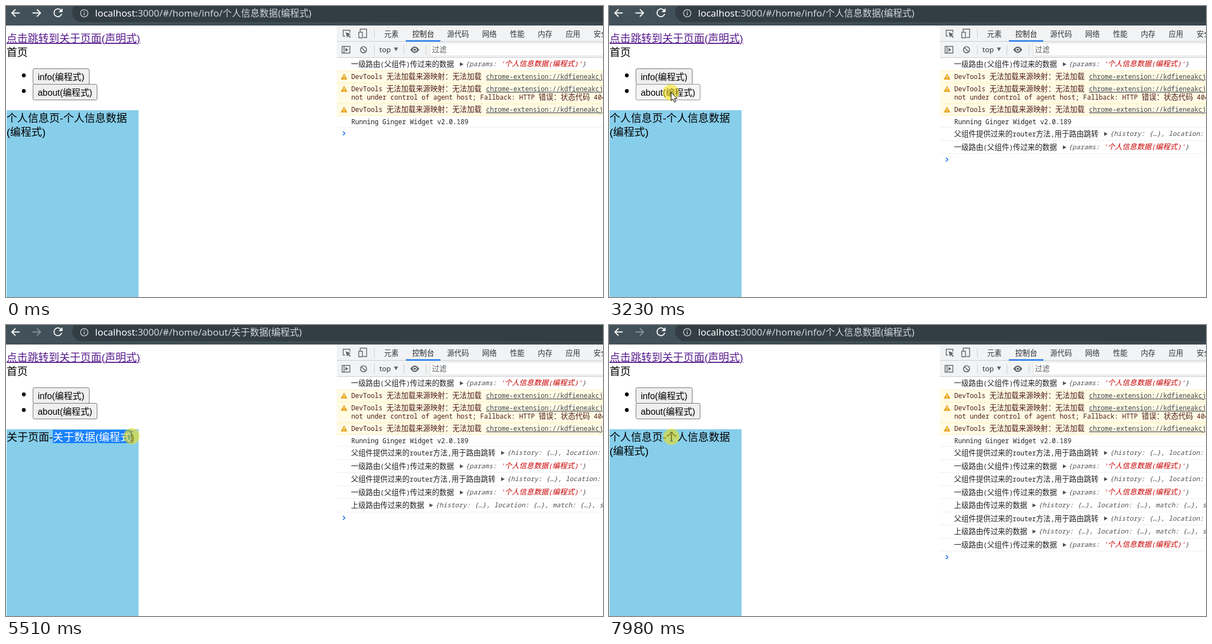
An HTML page for the animation above (8 s loop, 1072 by 522 pixels).

```html
<!DOCTYPE html>
<html lang="zh">
<head>
<meta charset="utf-8">
<style>
  html, body { margin: 0; width: 100%; height: 100%; overflow: hidden; background: #fff; }
  svg { display: block; }
  text { white-space: pre; }
</style>
</head>
<body>
<svg id="stage" width="1072" height="522" viewBox="0 0 1072 522">
  <defs>
    <linearGradient id="bar">
      <stop offset="0" stop-color="#43525a"/>
      <stop offset="1" stop-color="#39464e"/>
    </linearGradient>
    <clipPath id="selClip"><rect id="selClipBox" y="188" height="24"/></clipPath>
  </defs>
</svg>
<script>
const stage = document.getElementById('stage');
const SANS = "'Liberation Sans','Noto Sans CJK SC','Noto Sans CJK',sans-serif";
const UI = "'Noto Sans','Noto Sans CJK SC','Noto Sans CJK',sans-serif";
const MONO = "'Noto Sans Mono','Noto Sans CJK SC','Noto Sans CJK',monospace";

function el(tag, attrs, parent = stage) {
  const e = document.createElementNS('http://www.w3.org/2000/svg', tag);
  for (const k in attrs) e.setAttribute(k, attrs[k]);
  return parent.appendChild(e);
}
const group = (parent = stage) => el('g', {}, parent);
const rect = (x, y, width, height, fill, parent, more) =>
  el('rect', { x, y, width, height, fill, ...more }, parent);
const stroke = (d, color, width, parent) =>
  el('path', { d, fill: 'none', stroke: color, 'stroke-width': width }, parent);
const shape = (d, fill, parent) => el('path', { d, fill }, parent);
const show = (e, on) => { e.style.display = on ? '' : 'none'; };

// Adds text to a <text>, giving Chinese runs their own size.
function addRuns(node, str, cjkSize, attrs = {}) {
  for (const run of str.split(/([\u4e00-\u9fff\uff1a]+)/)) {
    if (!run) continue;
    const span = el('tspan', attrs, node);
    if (/[\u4e00-\u9fff]/.test(run)) span.setAttribute('font-size', cjkSize);
    span.textContent = run;
  }
}
function text(x, y, str, size, fill, parent, font = SANS, cjkSize = size, more = {}) {
  const node = el('text', { x, y, fill, 'font-size': size, 'font-family': font, ...more }, parent);
  addRuns(node, str, cjkSize);
  return node;
}
const mono = (x, y, str, fill, parent, more) =>
  text(x, y, str, 11.7, fill, parent, MONO, 13.15, more);

// Browser bar
rect(0, 0, 1072, 35, 'url(#bar)');
rect(119, -6, 1000, 35, '#323d44', stage, { rx: 17 });
stroke('M24.5 12.5H11M17 6l-6.5 6.5L17 19', '#fff', 1.8);
const forward = stroke('M47.5 12.5H61M55.5 6l6.5 6.5L55.5 19', '#fff', 1.8);
stroke('M99 8.2A7 7 0 1 0 100 14', '#fff', 1.8);
shape('M101.5 4v7h-7z', '#fff');
el('circle', { cx: 140.5, cy: 13, r: 6.6, fill: 'none', stroke: '#d3d8db', 'stroke-width': 1.3 });
stroke('M140.5 12v4.5M140.5 9v1.6', '#d3d8db', 1.5);
function address(path) {
  const node = text(160, 18.6, 'localhost', 17, '#fff', stage, UI, 16.6);
  addRuns(node, ':3000/#/home/' + path, 16.6, { fill: '#d2d7da' });
  return node;
}
const infoUrl = address('info/个人信息数据(编程式)');
const aboutUrl = address('about/关于数据(编程式)');

// Page
text(1, 65, '点击跳转到关于页面(声明式)', 18.95, '#551a8b', stage, SANS, 18.95,
  { 'text-decoration': 'underline' });
text(1, 89.5, '首页', 19.1, '#000');
function button(y, width, label) {
  el('circle', { cx: 32, cy: y + 12.5, r: 3.4 });
  const box = rect(48.5, y + .5, width, 28, '#efefef', stage, { rx: 2.5 });
  text(57, y + 20.5, label, 15.87, '#000');
  return (over, down) => {
    box.setAttribute('fill', over ? down ? '#f5f5f5' : '#e5e5e5' : '#efefef');
    box.setAttribute('stroke', over ? down ? '#8d8d8d' : '#4f4f4f' : '#767676');
  };
}
const infoButton = button(112, 101, 'info(编程式)');
const aboutButton = button(140, 115, 'about(编程式)');
rect(1, 187, 237, 335, '#87ceeb');

const infoPage = group(), aboutPage = group();
text(1, 207.5, '个人信息页-个人信息数据', 19.1, '#000', infoPage);
text(1, 232.5, '(编程式)', 19.1, '#000', infoPage);
const aboutText = '关于页面-关于数据(编程式)';
text(1.3, 207.5, aboutText, 19.1, '#000', aboutPage);
const selection = group(aboutPage);
const selBox = rect(0, 188, 0, 24, '#1a82fb', selection);
text(1.3, 207.5, aboutText, 19.1, '#fff', selection, SANS, 19.1, { 'clip-path': 'url(#selClip)' });
const selClipBox = document.getElementById('selClipBox');
const selStart = 1.3 + 19.1 * (4 + 1 / 3);
const edges = [selStart];
for (const c of '关于数据(编程式)') edges.push(edges.at(-1) + 19.1 * (/[()]/.test(c) ? 1 / 3 : 1));

// Developer panel
const GREY = '#5f6368';
rect(594, 35, 478, 57, '#f1f3f4');
rect(594, 63, 478, 1, '#cbcdd1');
rect(594, 92, 478, 1, '#cbcdd1');
stroke('M609 54h-3.5V43.5h12V48', GREY, 1.4);
shape('M610 47l9 3.5-3.6 1.5 3.5 3.5-1.5 1.5-3.5-3.5-1.5 3.6z', GREY);
stroke('M636 46v-4.5h11.5v15h-6M633.5 47h6.5v10h-6.5z', GREY, 1.4);
['元素', '控制台', '源代码', '网络', '性能', '内存', '应用', '安全'].forEach((tab, i) =>
  text([679, 729.5, 792, 855, 905, 955, 1005, 1055][i], 55, tab, 13.1, i == 1 ? '#202124' : '#333639', stage, UI));
rect(718, 61.5, 62, 2.5, '#1a73e8');
rect(661, 41, 1, 17, '#ccc');
for (const x of [661, 714, 754]) rect(x, 70, 1, 17, '#ccc');
stroke('M603.5 72.5h14v12h-14zM607 72.5v12', GREY, 1.4);
shape('M609.5 75l5 3.5-5 3.5z', GREY);
stroke('M636.5 78.5a5.5 5.5 0 1 0 11 0a5.5 5.5 0 1 0-11 0M638 74.5l8 8', GREY, 1.6);
text(670.5, 83, 'top', 13, '#333639', stage, UI);
shape('M696.5 74.5h7.5l-3.7 6.5z', GREY);
shape('M726 78.5q8-11.5 16 0q-8 11.5-16 0', GREY);
el('circle', { cx: 734, cy: 78.5, r: 3.6, fill: '#f1f3f4' });
el('circle', { cx: 734, cy: 78.5, r: 2.1, fill: GREY });
rect(761.5, 66.5, 320, 23, '#fff', stage, { stroke: '#dcdee0' });
text(765, 83, '过滤', 13.1, '#55595d', stage, UI);

// Console
const INK = '#202124', PREVIEW = '#4d5156', WARNING = '#4f1c14';
const rule = (y, parent, color = '#efefef') => rect(594, y, 478, 1, color, parent);
function expander(x, y, parent) {
  shape(`M${x} ${y - 3.5}l6.5 3.5-6.5 3.5z`, PREVIEW, parent);
}
function paramsRow(y, parent) {
  mono(619.5, y + 4, '一级路由(父组件)传过来的数据', INK, parent);
  expander(815, y, parent);
  const node = mono(825, y + 3.5, '', PREVIEW, parent, { 'font-style': 'italic' });
  addRuns(node, '{params: ', 13.15);
  addRuns(node, "'个人信息数据(编程式)'", 13.15, { fill: '#c80000' });
  addRuns(node, '}', 13.15);
}
function propsRow(y, label, x, parent) {
  mono(619.5, y + 4, label, INK, parent);
  expander(x, y - .5, parent);
  mono(x + 10.5, y + 3.2, '{history: {…}, location: {…}, match: {…}, staticContext: {…}}',
    PREVIEW, parent, { 'font-style': 'italic' });
}
const routerRow = (y, parent) => propsRow(y, '父组件提供过来的router方法,用于路由跳转', 889, parent);
const upperRow = (y, parent) => propsRow(y, '上级路由传过来的数据', 760.5, parent);

paramsRow(104.5);
for (const [top, height] of [[116, 22], [138, 37], [175, 21]]) {
  rect(594, top, 478, height, '#fffbe5');
  rule(top, stage, '#fff0b8');
  const y = top + 11;
  shape(`M607 ${y - 6}l6 11h-12z`, '#e8a317');
  stroke(`M607 ${y - 2.5}v4M607 ${y + 2.5}v1.5`, '#fff', 1.3);
  mono(620, y + 4, 'DevTools 无法加载来源映射：无法加载', WARNING);
  mono(862, y + 4, 'chrome-extension://kdfieneakcjfaiglcfcgkidlkmlijjnh', '#44474e', stage,
    { 'text-decoration': 'underline' });
}
mono(620, 168, 'not under control of agent host; Fallback: HTTP 错误：状态代码 404', WARNING);
rule(196, stage, '#fff0b8');
mono(620, 211.5, 'Running Ginger Widget v2.0.189', INK);
rule(217);

const ROW = 23.5;
const logged = [routerRow, paramsRow, routerRow, paramsRow, upperRow, routerRow, upperRow, paramsRow]
  .map((draw, i) => {
    const g = group();
    draw(230 + i * ROW, g);
    rule(Math.floor(217.5 + (i + 1) * ROW), g);
    return g;
  });
const prompt = stroke('M605 225l3.5 3.5-3.5 3.5', '#1a73e8', 1.6);

// Floating icon, click halo, pointer
const icon = el('circle', { cx: 263.5, cy: 164, fill: '#2a97b8' });
const pointer = group();
const halo = el('circle', { r: 14.5, fill: '#fce200', opacity: .52 }, pointer);
const arrow = el('path', {
  d: 'M.5 0v15l3.5-3.3 2.6 6 2.5-1.1-2.6-5.8h4.8z',
  fill: '#fff', stroke: '#000', 'stroke-linejoin': 'round'
}, pointer);
const beam = stroke('M-3-8h2.5l.5.5.5-.5h2.5M0-7.5v15M-3 8h2.5l.5-.5.5.5h2.5', '#555', .8, pointer);

const PATH = [ // ms, x, y
  [120, 769, 428], [500, 330, 225], [880, 120, 104], [1250, 105, 68], [1720, 89, 115],
  [1790, 88, 116], [1930, 84, 121], [2600, 84, 121], [3100, 111, 155], [3370, 111, 155],
  [3640, 130, 173], [3990, 100, 200], [4260, 93, 200], [4460, 91.5, 200], [4750, 188, 201],
  [5240, 224.5, 199.5], [5510, 225.5, 199.5], [5910, 226.5, 199.5], [6030, 228.5, 199.5],
  [6310, 228.5, 199.5], [6950, 108, 121.5], [7220, 108, 121.5], [7700, 112, 188], [7980, 112, 201.5]
];
const PRESSES = [[2070, 2210], [3160, 3370], [4460, 6030], [7080, 7220], [7950, 8000]];
const FIRST = 2210, TO_ABOUT = 3370, TO_INFO = 7220;

function pointerAt(t) {
  const i = PATH.findIndex(p => p[0] > t);
  if (i < 0) return PATH.at(-1).slice(1);
  const [t0, x0, y0] = PATH[i - 1], [t1, x1, y1] = PATH[i];
  const k = (t - t0) / (t1 - t0);
  return [x0 + (x1 - x0) * k, y0 + (y1 - y0) * k];
}

function render(t) {
  const about = t >= TO_ABOUT && t < TO_INFO;
  show(infoUrl, !about);
  show(aboutUrl, about);
  show(infoPage, !about);
  show(aboutPage, about);
  forward.setAttribute('stroke', t < TO_ABOUT ? '#fff' : '#87939a');

  const rows = t < FIRST ? 0 : t < TO_ABOUT ? 2 : t < TO_INFO ? 5 : 8;
  logged.forEach((g, i) => show(g, i < rows));
  prompt.setAttribute('transform', `translate(0 ${rows * ROW})`);

  // The pointer moves in steps of about 70 ms.
  const step = Math.floor((t - 120) / 70 + .01) * 70 + 120;
  const down = PRESSES.some(([a, b]) => t >= a && t < b);
  show(pointer, t >= 120);
  let x = -99, y = -99;
  if (t >= 120) {
    [x, y] = pointerAt(Math.max(120, step));
    pointer.setAttribute('transform', `translate(${x} ${y})`);
  }
  const overText = x < 238 && y > 188 && y < 238;
  show(arrow, !overText);
  show(beam, overText);
  show(halo, down);
  infoButton(x > 48 && x < 150 && y > 112 && y < 140, down);
  aboutButton(x > 48 && x < 164 && y > 140 && y < 168, down);

  const selected = t >= 4460 && t < TO_INFO;
  show(selection, selected);
  if (selected) {
    const dragX = t < 6030 ? x : 230;
    const end = edges.reduce((a, b) => Math.abs(b - dragX) < Math.abs(a - dragX) ? b : a);
    for (const box of [selBox, selClipBox]) {
      box.setAttribute('x', selStart);
      box.setAttribute('width', end - selStart);
    }
  }
  show(icon, t >= 6310 && t < 7150);
  icon.setAttribute('r', Math.min(17.3, 12 + Math.max(0, t - 6310) * .025));
}

const start = performance.now();
function tick() {
  render((performance.now() - start) % 8000);
  requestAnimationFrame(tick);
}
tick();
</script>
</body>
</html>
```
